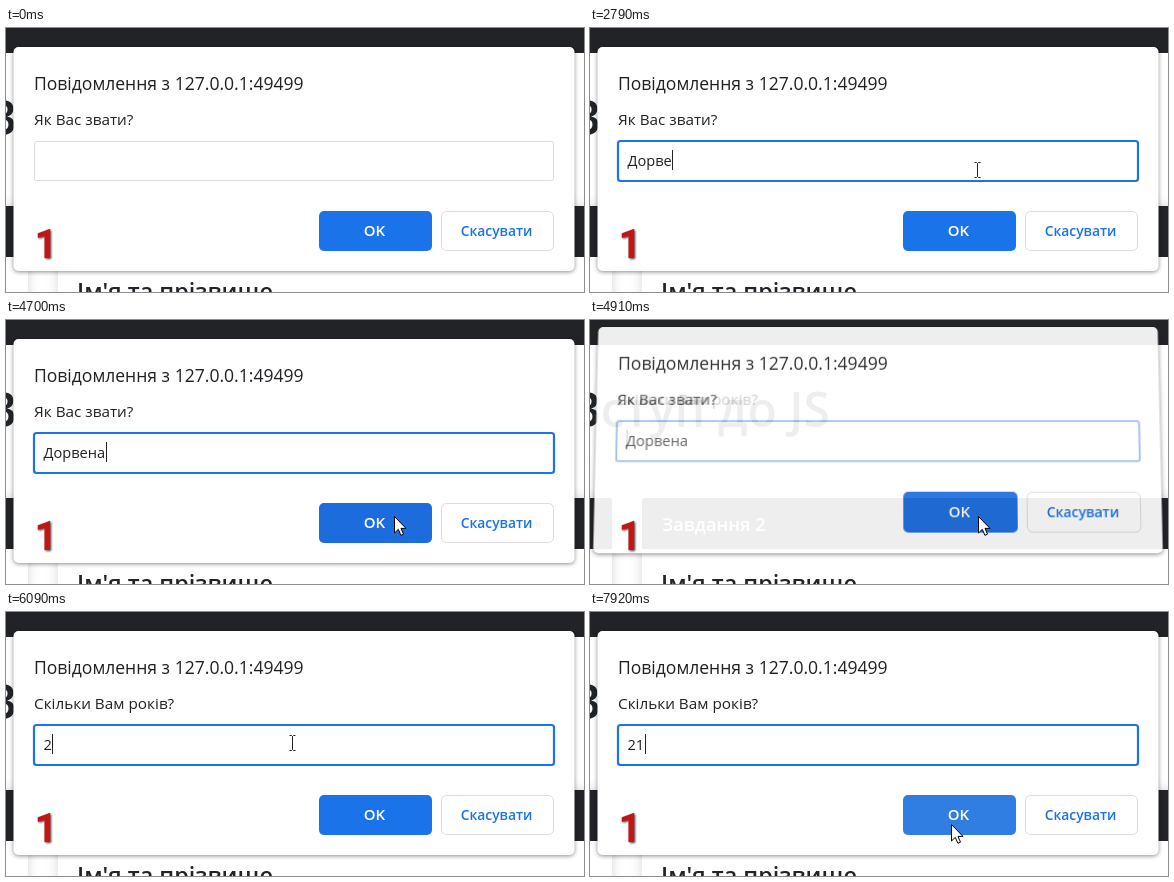
Write an HTML page that moves like this. It is 578 px wide and 264 px high and loops after 7.99 s.

```html
<!DOCTYPE html>
<html lang="uk">
<head>
<meta charset="utf-8">
<style>
html, body { margin: 0; width: 100%; height: 100%; overflow: hidden; background: #fff; }
svg { position: absolute; left: 0; top: 0; width: 578px; height: 264px; overflow: hidden; }
text { font-family: "Open Sans", "Noto Sans", sans-serif; white-space: pre; }
.dialog { transform-origin: 288px 131px; fill: #202124; }
.panel { fill: #fff; filter: drop-shadow(0 1px 2px rgba(0, 0, 0, .45)); }
.line { fill: #fff; stroke: #dadce0; }
.card { filter: drop-shadow(0 0 6px rgba(0, 0, 0, .16)); }
.mark { font: 700 40px Roboto, sans-serif; fill: #c41414; filter: drop-shadow(1px 1px 1px rgba(0, 0, 0, .75)); }
</style>
</head>
<body>
<svg viewBox="0 0 578 264">
  <rect width="578" height="264" fill="#fff"/>
  <rect width="578" height="25" fill="#212327"/>
  <text x="240" y="107" text-anchor="end" font-size="48" font-weight="600" fill="#212529">Вступ до JS</text>
  <g class="card">
    <rect x="-60" y="178" width="82" height="120" rx="4" fill="#fff"/>
    <rect x="52" y="178" width="560" height="120" rx="4" fill="#fff"/>
  </g>
  <path d="M0 178H19a3 3 0 0 1 3 3V229H0ZM55 178H578V229H52V181a3 3 0 0 1 3-3Z" fill="#212327"/>
  <text x="72" y="211" font-size="18.2" font-weight="600" fill="#fff">Завдання 2</text>
  <text x="71" y="272" font-size="23.4" font-weight="600" fill="#212529">Ім'я та прізвище</text>
</svg>
<svg class="dialog" viewBox="0 0 578 264"></svg>
<svg class="dialog" viewBox="0 0 578 264"></svg>
<svg viewBox="0 0 578 264">
  <text class="mark" x="28.5" y="230">1</text>
  <g id="pointer">
    <path id="arrow" d="M.5 .5V17L4.3 13.4 6.9 19.3 9.5 18.2 7 12.4H12Z" fill="#fff" stroke="#000"/>
    <path id="beam" d="M-3.5 -7.5H-1.5L-.5 -6.5 .5 -7.5H2.5M-.5 -6.5V6.5M-3.5 7.5H-1.5L-.5 6.5 .5 7.5H2.5" fill="none" stroke="#222"/>
  </g>
</svg>
<script>
const LOOP = 7990, SWAP = 4770;
const $ = id => document.getElementById(id);

const clamp = v => Math.max(0, Math.min(1, v));
const ramp = (t, a, b) => clamp((t - a) / (b - a));
const ease = p => p * p * (3 - 2 * p);

// Piecewise-linear value through [time, value] points
function track(t, points) {
  let value = points[0][1];
  for (let i = 1; i < points.length; i++) {
    const [a, from] = points[i - 1], [b, to] = points[i];
    if (t >= a) value = from + (to - from) * ramp(t, a, b);
  }
  return value;
}

function makeDialog(svg, question, answer, focusAt, blurAt, keys) {
  svg.innerHTML = `
    <rect class="panel" x="7.5" y="19" width="561" height="224" rx="5"/>
    <text x="28" y="62" font-size="17.55">Повідомлення з 127.0.0.1:49499</text>
    <text x="28" y="97" font-size="15.3">${question}</text>
    <rect class="line" x="28.5" y="113.5" width="519" height="39" rx="2"/>
    <rect data-part="ring" x="28" y="113" width="520" height="40" rx="2.5" fill="none" stroke="#1a73e8" stroke-width="2.2"/>
    <text data-part="value" x="37.5" y="138" font-size="14.6"></text>
    <rect data-part="caret" y="122" width="1" height="20"/>
    <rect data-part="ok" x="313" y="183" width="113" height="40" rx="5"/>
    <text x="368.5" y="208" font-size="15" font-weight="600" text-anchor="middle" fill="#fff">OK</text>
    <rect class="line" x="435.5" y="183.5" width="112" height="39" rx="5"/>
    <text x="490.5" y="208" font-size="13.8" font-weight="600" text-anchor="middle" fill="#1a73e8">Скасувати</text>`;
  const part = name => svg.querySelector(`[data-part=${name}]`);
  const ring = part('ring'), value = part('value'), caret = part('caret'), ok = part('ok');

  return (t, focus, opacity, color) => {
    const typed = keys.filter(k => k <= t);
    const since = t - (typed.at(-1) ?? focusAt);
    const blinkOn = since >= 0 && since % 1060 < 530 && t < blurAt;
    value.textContent = answer.slice(0, typed.length);
    caret.setAttribute('x', typed.length ? Math.round(38 + value.getComputedTextLength()) : 38);
    caret.style.opacity = blinkOn ? 1 : 0;
    ring.style.opacity = focus;
    ok.style.fill = color;
    svg.style.opacity = opacity;
    const lift = track(t, [[SWAP, 0], [4910, 1], [5190, 0]]);
    svg.style.transform = lift
      ? `perspective(1500px) translateY(${-12 * lift}px) rotateX(${7 * lift}deg) scale(${1 + .006 * lift}, ${1 + .018 * lift})`
      : 'none';
  };
}

const [first, second] = document.querySelectorAll('.dialog');
const drawName = makeDialog(first, 'Як Вас звати?', 'Дорвена', 990, SWAP,
  [1470, 1880, 2160, 2370, 2790, 3140, 3360]);
const drawAge = makeDialog(second, 'Скільки Вам років?', '21', 4820, LOOP, [6090, 6580]);

// [start, end, from, to]
const moves = [
  [220, 780, [440, 275], [388, 142]],
  [3860, 4280, [388, 142], [388, 196]],
  [5050, 5470, [388, 196], [287, 131]],
  [7150, 7640, [287, 131], [361, 212]]
];

function drawPointer(t) {
  const [a, b, from, to] = moves.findLast(m => t >= m[0]) ?? moves[0];
  const p = ease(ramp(t, a, b));
  const [x, y] = from.map((v, i) => Math.round(v + (to[i] - v) * p));
  const overField = x > 28 && x < 548 && y > 113 && y < 153;
  $('pointer').setAttribute('transform', `translate(${x} ${y})`);
  $('beam').style.display = overField ? '' : 'none';
  $('arrow').style.display = overField ? 'none' : '';
}

const mix = (a, b, p) => `rgb(${a.map((v, i) => v + (b[i] - v) * p)})`;
const BLUE = [26, 115, 232], HOVER = [48, 126, 226], PRESSED = [28, 108, 222];

function frame(now) {
  const t = now % LOOP;
  const press = ramp(t, 4560, 4700);
  drawName(t,
    t < 990 ? 0 : track(t, [[SWAP, 1], [4980, 0]]),
    track(t, [[SWAP, 1], [4910, .91], [5050, 0]]),
    press ? mix(HOVER, PRESSED, press) : mix(BLUE, HOVER, ramp(t, 4280, 4490)));
  drawAge(t,
    track(t, [[4840, .1], [5120, 1]]),
    track(t, [[4840, 0], [4910, .22], [5050, 1]]),
    mix(BLUE, HOVER, ramp(t, 7500, 7780)));
  drawPointer(t);
  requestAnimationFrame(frame);
}
requestAnimationFrame(frame);
</script>
</body>
</html>
```
